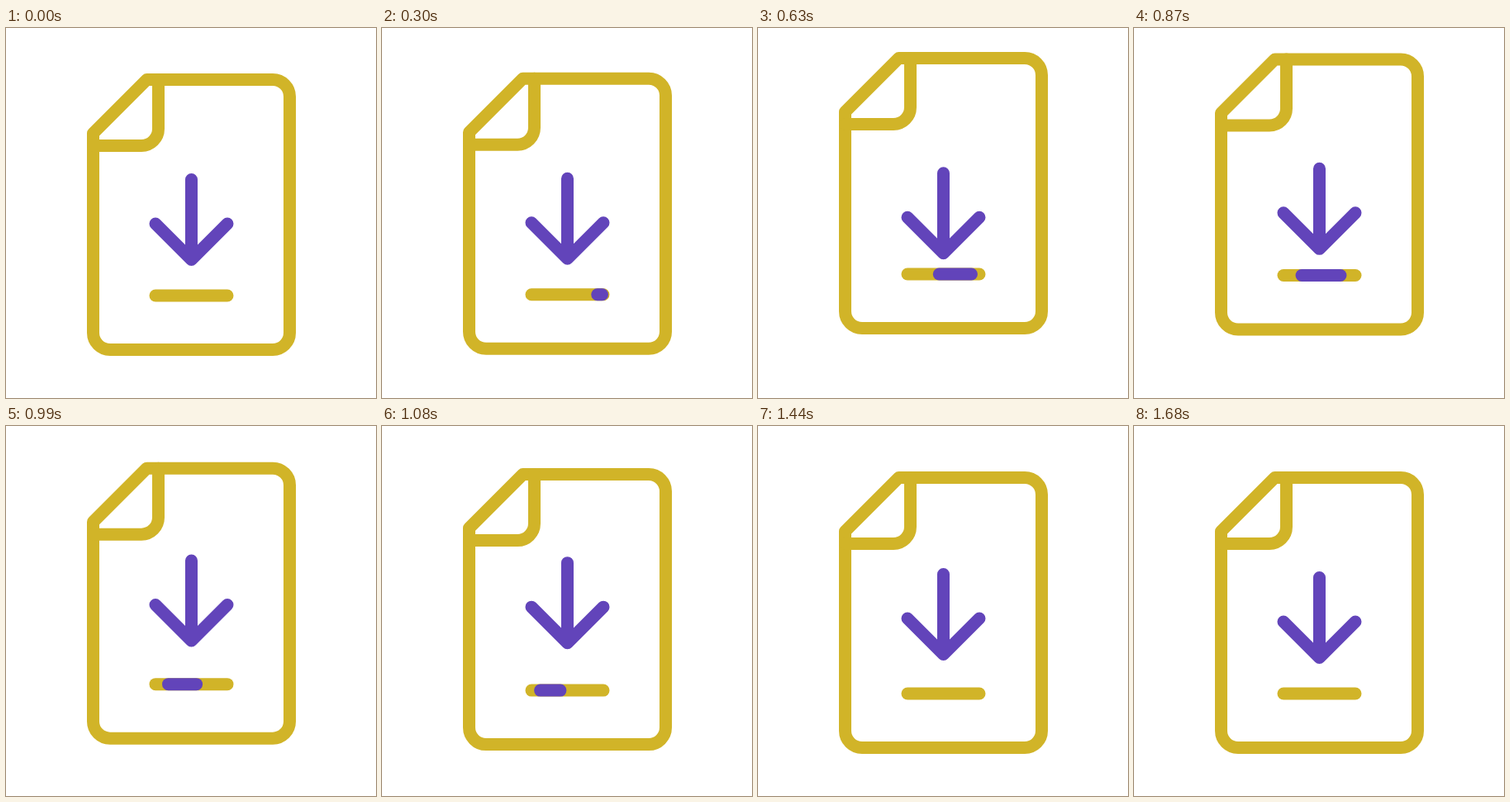
An HTML page for the animation above (1860 ms loop, 448 by 448 pixels).

```html
<!DOCTYPE html>
<html lang="en">
<head>
<meta charset="utf-8">
<title>Download</title>
<style>
  html, body { margin: 0; width: 100%; height: 100%; overflow: hidden; background: #fff; }
  svg { display: block; width: 100%; height: 100%; }
  path { fill: none; stroke-width: 15; stroke-linecap: round; stroke-linejoin: round; }
  .gold { stroke: #d1b428; }
  .violet { stroke: #6244ba; }
</style>
</head>
<body>
<svg viewBox="0 0 448 448">
  <g id="doc">
    <path class="gold" d="M105.5 127.5 L170.5 62.5 H323 A20.5 20.5 0 0 1 343.5 83 V369 A20.5 20.5 0 0 1 323 389.5 H126 A20.5 20.5 0 0 1 105.5 369 Z"/>
    <path class="gold" d="M105.5 142.5 H164 A20.5 20.5 0 0 0 184.5 122 V62.5"/>
    <path class="gold" d="M181 324 H268"/>
    <path id="fill" class="violet"/>
    <path id="arrow" class="violet" d="M224.5 183.5 V280.5 M181 237 L224.5 280.5 L268 237"/>
  </g>
</svg>
<script>
const LOOP = 1860, STEP = 30;
const BAR = { left: 181, right: 268, y: 324 };
const doc = document.getElementById('doc');
const arrow = document.getElementById('arrow');
const fill = document.getElementById('fill');

// [time, value] keys
const docKeys = [[210, 0], [750, -27], [1290, 0]];
const arrowKeys = [[320, 0], [735, 19.2], [1170, -15], [1690, 0]];
const headKeys = [[240, 0], [420, .25], [630, .56], [690, .634], [1275, 1]];
const tailKeys = [[240, 0], [420, .05], [630, .11], [850, .17], [990, .43], [1230, .88], [1290, 1]];

const bezier = (a, b, u) => 3 * a * u * (1 - u) ** 2 + 3 * b * u * u * (1 - u) + u ** 3;

function ease(x) {
  let lo = 0, hi = 1;
  for (let i = 0; i < 24; i++) {
    const mid = (lo + hi) / 2;
    if (bezier(.52, .25, mid) < x) lo = mid; else hi = mid;
  }
  return bezier(0, 1, lo);
}

const linear = x => x;

function track(keys, t, curve) {
  if (t <= keys[0][0]) return keys[0][1];
  for (let i = 1; i < keys.length; i++) {
    const [t0, v0] = keys[i - 1], [t1, v1] = keys[i];
    if (t < t1) return v0 + (v1 - v0) * curve((t - t0) / (t1 - t0));
  }
  return keys[keys.length - 1][1];
}

function draw(t) {
  doc.setAttribute('transform', `translate(0 ${track(docKeys, t, ease).toFixed(2)})`);
  arrow.setAttribute('transform', `translate(0 ${track(arrowKeys, t, ease).toFixed(2)})`);

  const head = track(headKeys, t, linear), tail = track(tailKeys, t, linear);
  const barX = p => (BAR.right - p * (BAR.right - BAR.left)).toFixed(2);
  fill.setAttribute('d', head > tail ? `M${barX(head)} ${BAR.y} H${barX(tail)}` : '');
}

const start = performance.now();
function tick() {
  const t = (performance.now() - start) % LOOP;
  draw(Math.floor(t / STEP) * STEP);
  requestAnimationFrame(tick);
}
draw(0);
requestAnimationFrame(tick);
</script>
</body>
</html>
```
